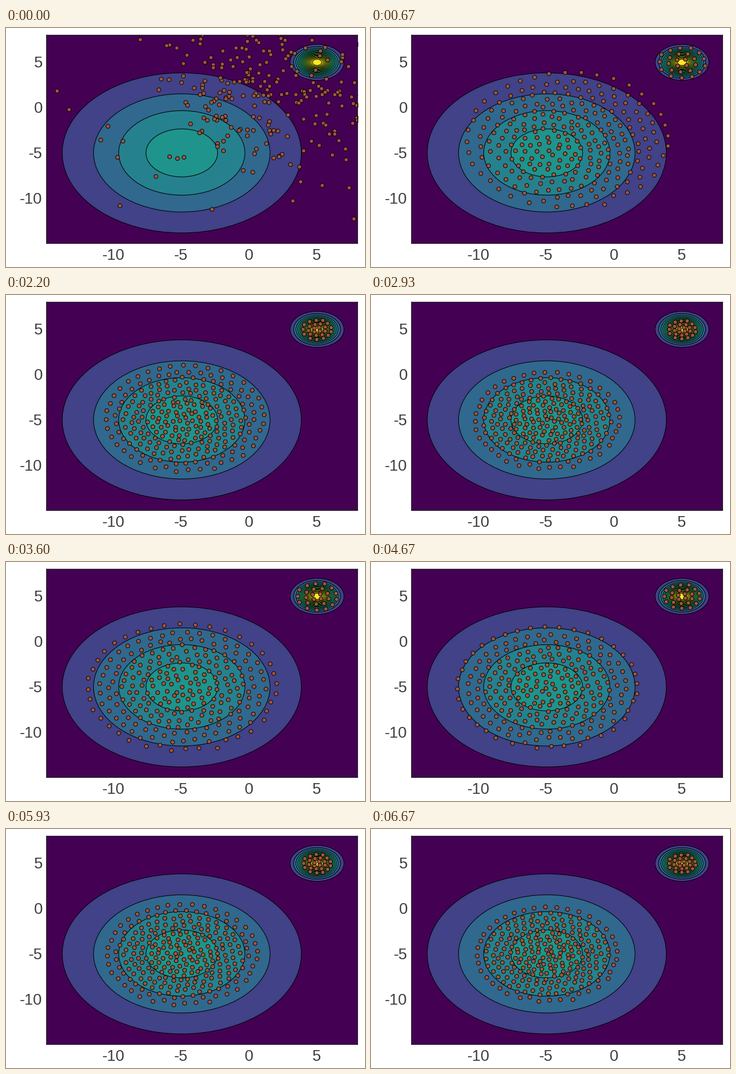
Recreate the animation shown at these times as a matplotlib script. Size 600 by 400 pixels, loop 6.74 s.

```python
import numpy as np
import matplotlib.pyplot as plt
from matplotlib.animation import FuncAnimation
from matplotlib.patches import Ellipse

W, H, DPI = 600, 400, 100
LEFT, RIGHT, TOP, BOTTOM = 67.7, 587.7, 12, 360.6
LO, HI = -15, 8
FRAMES, LOOP_MS, CYCLE = 101, 6740, 50
PX = 72 / DPI

WIDE = np.array([-5.0, -5.0])
NARROW = np.array([5.0, 5.0])
LEVELS = 16
N_TOTAL, N_NARROW = 286, 26

rng = np.random.default_rng(4)


def relax(points, steps=700, dt=0.01, max_step=0.03):
    """Settle points in a round bowl under short-range repulsion."""
    p = (points - points.mean(0)) / (2 * points.std())
    strength = 0.11 / len(p)
    for _ in range(steps):
        d = p[:, None] - p[None]
        dist2 = (d ** 2).sum(-1) + 1e-5
        push = strength * (d / dist2[..., None] ** 2).sum(1)
        step = dt * (push - p)
        length = np.hypot(*step.T)[:, None]
        p = p + step * np.minimum(1, max_step / np.maximum(length, 1e-9))
    r = np.sort(np.hypot(*p.T))
    return p / r[-len(r) // 12:].mean()


class Cluster:
    def __init__(self, start, center):
        self.start, self.center = start, center
        self.shape = relax(start)
        inner = np.clip(1 - (self.shape ** 2).sum(1), 0, 1)
        self.amp = (0.004 + 0.015 * inner)[:, None]
        self.phase = rng.uniform(0, 2 * np.pi, start.shape)
        self.speed = rng.uniform(0.12, 0.3, start.shape)

    def at(self, n, radius, shift):
        wobble = self.amp * np.sin(self.speed * n + self.phase)
        goal = self.center + shift + radius * (self.shape + wobble)
        return goal + (self.start - goal) * np.exp(-(n / 3.5) ** 1.4)


start = rng.normal((1.5, 2.0), 5, (N_TOTAL, 2))
order = np.argsort(np.hypot(*(start - NARROW).T))
wide = Cluster(start[order[N_NARROW:]], WIDE)
narrow = Cluster(start[order[:N_NARROW]], NARROW)


def swell(n, rise=6):
    """Quick expansion at the start of a cycle, then slow contraction."""
    p = n if n <= CYCLE else n - CYCLE
    if p < rise:
        return np.sin(np.pi / 2 * p / rise)
    return (1 - (p - rise) / (CYCLE - rise)) ** 1.5


def positions(n):
    s = swell(n)
    lag = 2 * max(0, 1 - n / 36)
    return np.vstack([wide.at(n, 5.2 + 2.55 * s, lag),
                      narrow.at(n, 1.03 + 0.95 * s ** 2, 0)])


def level_color(k):
    return plt.cm.viridis(np.log1p(0.6 * k) / np.log1p(0.6 * LEVELS))


def draw_contours(ax, center, peak, falloff):
    for k in range(1, LEVELS + 1):
        if k >= peak:
            break
        d = 2 * np.sqrt(np.log(peak / k) / falloff)
        ax.add_patch(Ellipse(center, d, d, fc=level_color(k), ec="black",
                             lw=PX, zorder=1))


def label(text, x, y, ha):
    fig.text(x / W, 1 - (y + 9) / H, text, ha=ha, va="baseline",
             family="Liberation Sans", size=26 * PX, color="#3c3c3c")


fig = plt.figure(figsize=(W / DPI, H / DPI), dpi=DPI, facecolor="white")
ax = fig.add_axes([LEFT / W, 1 - BOTTOM / H, (RIGHT - LEFT) / W,
                   (BOTTOM - TOP) / H], facecolor=level_color(0))
ax.set(xlim=(LO, HI), ylim=(LO, HI), xticks=[], yticks=[])
for spine in ax.spines.values():
    spine.set(linewidth=PX, snap=False)

draw_contours(ax, WIDE, 4.586, 0.0195)
draw_contours(ax, NARROW, 17.4, 0.721)

for v in (-10, -5, 0, 5):
    f = (v - LO) / (HI - LO)
    label(str(v), LEFT + f * (RIGHT - LEFT) - 1, 379, "center")
    label(str(v), 61, BOTTOM - f * (BOTTOM - TOP), "right")

dots = ax.scatter(*positions(0).T, s=(6.6 * PX) ** 2, c="#a0553c",
                  edgecolors="black", linewidths=0.9 * PX, zorder=2)


def update(n):
    dots.set_offsets(positions(n))
    return (dots,)


anim = FuncAnimation(fig, update, frames=FRAMES, interval=LOOP_MS / FRAMES,
                     repeat=True, repeat_delay=0)
plt.show()
```
